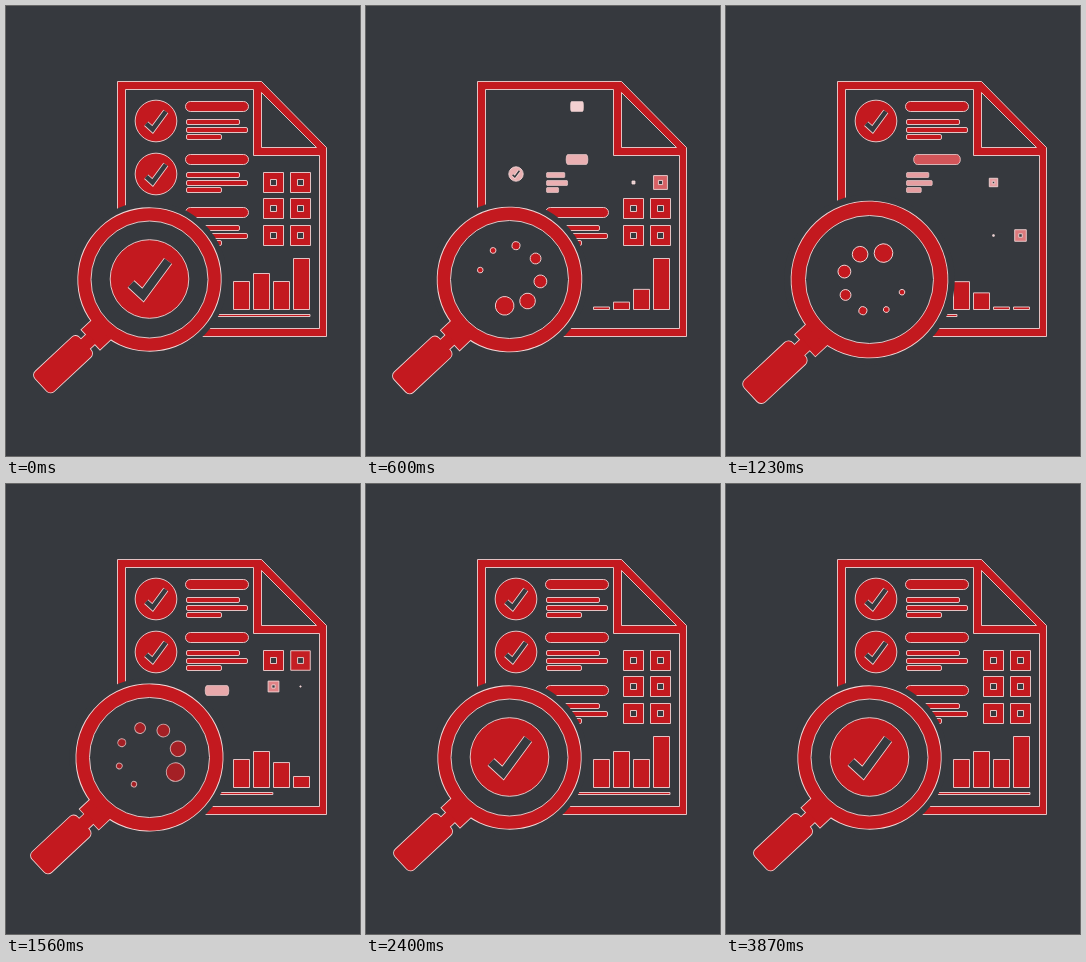
An HTML page with a canvas that plays this animation: 354 by 450 pixels, repeating every 3900 ms.

```html
<!DOCTYPE html>
<html lang="en">
<head>
<meta charset="utf-8">
<title>Report check</title>
<style>
html, body { margin: 0; width: 100%; height: 100%; overflow: hidden; background: #36393e; }
canvas { display: block; width: 354px; height: 450px; }
</style>
</head>
<body>
<canvas id="stage" width="354" height="450"></canvas>
<script>
const ctx = document.getElementById('stage').getContext('2d');
const LOOP = 3900, STEP = 30;
const BG = '#36393e', EDGE = '#f0d4d4', RED = [195, 25, 31];
const LENS = { x: 143.5, y: 273.5 };

// Eased progress 0..1 of a move that begins at start.
function ease(t, start, length) {
  const x = Math.min(1, Math.max(0, (t - start) / length));
  return (1 - Math.cos(Math.PI * x)) / 2;
}

// Amount visible: 1, shrinking to 0, later growing back to 1.
function shown(t, outStart, outLength, inStart, inLength) {
  return t < inStart ? 1 - ease(t, outStart, outLength) : ease(t, inStart, inLength);
}

// Red that fades towards white.
function tint(p) {
  return `rgb(${RED.map(c => Math.round(255 + (c - 255) * p)).join()})`;
}

// Length of one stage pixel under the current transform.
function pixel() {
  const m = ctx.getTransform();
  return 1 / Math.hypot(m.c, m.d);
}

function paint(path, color = tint(1)) {
  ctx.fillStyle = color;
  ctx.fill(path, 'evenodd');
  ctx.strokeStyle = EDGE;
  ctx.lineWidth = 0.9 * pixel();
  ctx.stroke(path);
}

function placed(x, y, sx, sy, draw) {
  ctx.save();
  ctx.translate(x, y);
  ctx.scale(sx, sy);
  draw();
  ctx.restore();
}

function box(x, y, w, h, r = 0) {
  const path = new Path2D();
  path.roundRect(x, y, w, h, r);
  return path;
}

function disc(x, y, r) {
  const path = new Path2D();
  path.arc(x, y, r, 0, 2 * Math.PI);
  return path;
}

function polygons(...shapes) {
  return new Path2D(shapes.map(points => 'M' + points + 'Z').join(''));
}

const sheet = polygons(
  '111.5 75.5 255.5 75.5 320.5 141.5 320.5 330.5 111.5 330.5',
  '119.5 83.5 247.5 83.5 247.5 149.5 313.5 149.5 313.5 322.5 119.5 322.5',
  '255.5 86.5 255.5 141.5 310.5 141.5');
const tick = new Path2D('M-18.5 5L-6.5 16L18.5-18');

function drawTick(color, edge) {
  if (edge) {
    ctx.lineWidth = 8.4 + 1.6 * pixel();
    ctx.strokeStyle = EDGE;
    ctx.stroke(tick);
  }
  ctx.lineWidth = 8.4;
  ctx.strokeStyle = color;
  ctx.stroke(tick);
}

function drawBadge(x, y, size, p, tickProgress = 1) {
  if (p < 0.06) return;
  placed(x, y, size * p, size * p, () => {
    paint(disc(0, 0, 39.3), tint(p));
    ctx.rotate(-0.4 * (1 - tickProgress));
    const fade = 1 - 1.8 * tickProgress;
    if (fade > 0) drawTick(tint(fade), false);
    else drawTick(BG, true);
  });
}

function drawRow(t, i) {
  const y = 95.5 + 53 * i, out = 300 * i, back = 450 * i;
  const bar = shown(t, out, 500, 450 + back, 500);
  const lines = shown(t, out, 500, 600 + back, 400);
  if (bar > 0.02) {
    placed(211, y, bar, 1, () => paint(box(-31.5, 0, 63, 10, 5), tint(bar)));
  }
  if (lines > 0.02) {
    [53, 61, 35].forEach((w, n) => placed(180.5, y + 18 + Math.round(7.5 * n), lines, 1,
      () => paint(box(0, 0, w, 5, 1.5), tint(lines))));
  }
  if (i < 2) drawBadge(150, y + 19.5, 0.53, shown(t, out, 500, 750 + back, 225));
}

function drawSquare(t, i) {
  const p = shown(t, 300 + 150 * i, 400, 1050 + 150 * i, 400);
  if (p < 0.04) return;
  const x = i % 2 ? 294.5 : 267.5;
  const y = 176.5 + Math.round(26.3 * Math.floor(i / 2));
  placed(x, y, p, p, () => {
    const path = box(-10, -10, 20, 20);
    path.addPath(box(-3, -3, 6, 6));
    paint(path, tint(p));
  });
}

function drawBars(t) {
  [28, 36, 28, 51].forEach((height, i) => {
    const p = shown(t, 150 + 150 * i, 400, 850 + 200 * i, 400);
    const h = 2.5 + (height - 2.5) * p;
    paint(box(227.5 + 20 * i, 303.5 - h, 16, h));
  });
  const base = shown(t, 0, 280, 665, 1500);
  if (base > 0.01) paint(box(198, 308.5, 106 * base, 2));
}

function drawSpinner(t) {
  const alpha = ease(t, 150, 140) * (1 - ease(t, 1520, 130));
  if (!alpha) return;
  ctx.save();
  ctx.globalAlpha = alpha;
  ctx.translate(146, 272.7);
  ctx.rotate((0.3 * t - 79.3) * Math.PI / 180);
  ctx.translate(-2.6, 2.2);
  [9.3, 7.8, 6.4, 5.4, 4, 2.9, 2.8].forEach((r, i) => {
    const a = -i * Math.PI / 4;
    paint(disc(30.6 * Math.cos(a), 30.6 * Math.sin(a), r));
  });
  ctx.restore();
}

function drawLens(t) {
  const phase = Math.min(1, Math.max(0, (t - 570) / 1080));
  const scale = 1 + 0.1 * Math.sin(Math.PI * phase);
  placed(LENS.x, LENS.y, scale, scale, () => {
    ctx.fillStyle = BG;
    ctx.fill(disc(0, 0, 78));
    ctx.save();
    ctx.rotate(137 * Math.PI / 180);
    const parts = [box(66, -17.5, 18, 27), box(82, -10, 11, 13),
      box(91, -16.5, 60, 27, 5), disc(0, 0, 71.3)];
    ctx.strokeStyle = EDGE;
    ctx.lineWidth = 1.7 * pixel();
    parts.forEach(part => ctx.stroke(part));
    ctx.fillStyle = tint(1);
    parts.forEach(part => ctx.fill(part));
    ctx.restore();
    paint(disc(0, 0, 58.5), BG);
  });
  drawSpinner(t);
  const tickProgress = t < 1500 ? 1 : ease(t, 1750, 410);
  drawBadge(LENS.x, 273, 1, shown(t, 0, 280, 1650, 250), tickProgress);
}

function render(now) {
  const t = Math.floor(now % LOOP / STEP) * STEP;
  ctx.fillStyle = BG;
  ctx.fillRect(0, 0, 354, 450);
  paint(sheet);
  for (let i = 0; i < 3; i++) drawRow(t, i);
  for (let i = 0; i < 6; i++) drawSquare(t, i);
  drawBars(t);
  drawLens(t);
}

let begin;
function loop(now) {
  begin ??= now;
  render(now - begin);
  requestAnimationFrame(loop);
}
render(0);
requestAnimationFrame(loop);
</script>
</body>
</html>
```
